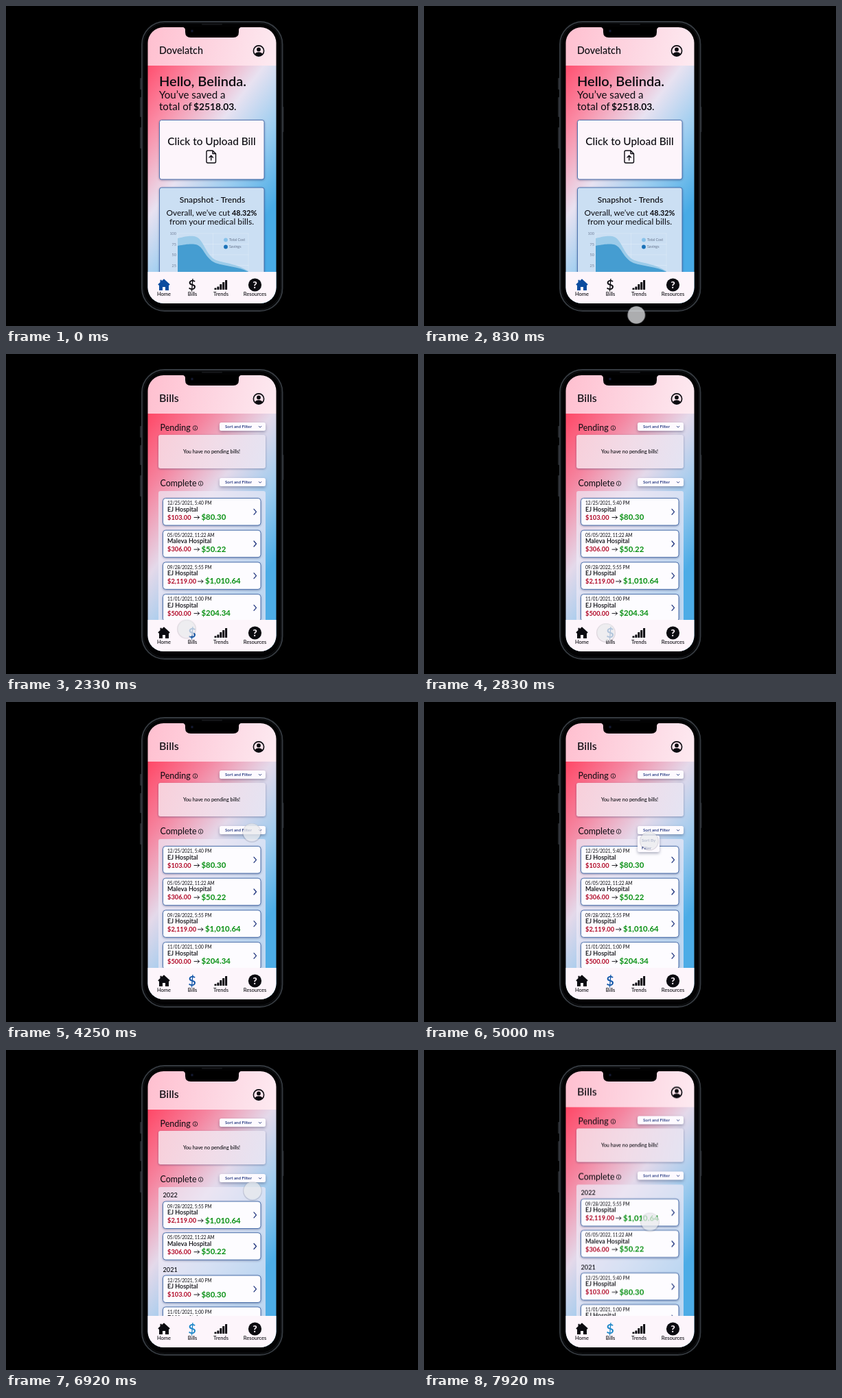
An HTML page for the animation above (8000 ms loop, 600 by 467 pixels).

```html
<!DOCTYPE html>
<html lang="en">
<head>
<meta charset="utf-8">
<title>Medical bill app</title>
<style>
  html, body { margin: 0; width: 100%; height: 100%; overflow: hidden; background: #000; }
  svg { display: block; width: 100vw; height: 100vh; }
  text { font-family: Lato, "Open Sans", sans-serif; white-space: pre; }
  .lift { filter: drop-shadow(0 1.5px 1.5px rgba(30, 40, 90, .4)); }
  .pop { filter: drop-shadow(0 2px 2px rgba(20, 30, 70, .35)); }
  .line { fill: none; stroke-linecap: round; stroke-linejoin: round; }
</style>
</head>
<body>
<svg id="stage" viewBox="0 0 600 467" xmlns="http://www.w3.org/2000/svg"></svg>
<script>
const LOOP = 8000;
const ENTER = 600, OPEN_BILLS = 2000, OPEN_MENU = 4500, OPEN_SORT = 5080, SORTED = 6500;
const INK = '#0b0b10', NAVY = '#1a2f7a', PAPER = '#fdf5fb', EDGE = '#4068a8';

const text = (x, y, size, str, { weight = 400, fill = INK, anchor = 'start' } = {}) =>
  `<text x="${x}" y="${y}" font-size="${size}" font-weight="${weight}" fill="${fill}" text-anchor="${anchor}">${str}</text>`;
const box = (x, y, w, h, r, fill, extra = '') =>
  `<rect x="${x}" y="${y}" width="${w}" height="${h}" rx="${r}" fill="${fill}" ${extra}/>`;
const line = (d, stroke, width) =>
  `<path class="line" d="${d}" stroke="${stroke}" stroke-width="${width}"/>`;
const dot = (x, y, r, fill, extra = '') =>
  `<circle cx="${x}" cy="${y}" r="${r}" fill="${fill}" ${extra}/>`;
const group = (id, body) => `<g id="${id}">${body}</g>`;
const edged = `stroke="${EDGE}" stroke-width=".9" class="lift"`;

function gradient(id, [x1, y1, x2, y2], stops) {
  const list = stops.map(([at, color]) => `<stop offset="${at}" stop-color="${color}"/>`).join('');
  return `<linearGradient id="${id}" gradientUnits="userSpaceOnUse" x1="${x1}" y1="${y1}" x2="${x2}" y2="${y2}">${list}</linearGradient>`;
}

const defs = `<defs>
  ${gradient('homeBg', [206, 87, 421, 251], [[0, '#ff4f6f'], [.22, '#fa8ba5'], [.5, '#e8e2f1'], [.74, '#9bcdf0'], [1, '#48abe6']])}
  ${gradient('billsBg', [206, 87, 427, 256], [[0, '#ff4766'], [.25, '#f5849f'], [.52, '#e4d9ea'], [.75, '#9fcbee'], [1, '#4cace6']])}
  ${gradient('headBg', [206, 45, 394, 80], [[0, '#ffc0d0'], [.6, '#fdd9e4'], [1, '#fdeaf1']])}
  ${gradient('pendingBg', [222, 118, 378, 167], [[0, '#f8cfda'], [.5, '#f1dce8'], [1, '#e4e4f3']])}
  <clipPath id="screen"><rect x="206.5" y="31" width="187" height="403" rx="23"/></clipPath>
</defs>`;

const phone =
  box(195, 105, 3, 17, 1, '#24272b') + box(195, 133, 3, 29, 1, '#24272b') +
  box(195, 177, 3, 31, 1, '#24272b') + box(402, 147, 2.5, 37, 1, '#24272b') +
  box(198, 23, 204.5, 422, 33, '#000', 'stroke="#353a40" stroke-width="1.9"') +
  box(200.3, 25.3, 200, 417.4, 31, '#020203', 'stroke="#15171a" stroke-width="1"');

const notch =
  '<path d="M256 30.5q5 .5 5 4.500v3q0 8 8 8h62q8 0 8-8v-3q0-4 5-4.500z" fill="#000"/>' +
  dot(271, 36.5, 2.2, '#0a0d18') + dot(271, 36.5, .9, '#1c2547') + box(285, 26, 30, 1.6, .8, '#17191c');

const header = (title, size) =>
  box(200, 20, 200, 67, 0, 'url(#headBg)') +
  text(223, 70.3, size, title, { weight: 500 }) +
  dot(368, 65.5, 7.6, 'none', `stroke="${INK}" stroke-width="1.6"`) +
  dot(368, 63.4, 2.9, INK) +
  `<path d="M362.300 70.300q1.700-3 5.700-3t5.700 3q-2.200 2.800-5.700 2.800t-5.700-2.800z" fill="${INK}"/>`;

function nav(homeColor, billsColor) {
  const label = (x, str) => text(x, 423, 7.5, str, { weight: 500, anchor: 'middle' });
  const bars = [2.5, 4.5, 8, 11, 14].map((h, i) => box(303.5 + i * 3.9, 414 - h, 3, h, .6, INK)).join('');
  return box(206, 388, 188, 47, 0, PAPER) +
    `<path d="M230 398.200l8.700 8-1 1.200h-.7v7.600h-5v-5h-4v5h-5v-7.600h-.7l-1-1.200 3.200-3v-3.400h2.200v1.400z" fill="${homeColor}"/>` +
    text(271, 414, 20, '$', { weight: 600, fill: billsColor, anchor: 'middle' }) + bars +
    dot(362.5, 407, 9.6, INK) +
    text(362.5, 412, 14, '?', { weight: 800, fill: PAPER, anchor: 'middle' }) +
    label(230, 'Home') + label(271.5, 'Bills') + label(313, 'Trends') + label(362.5, 'Resources');
}

function chart() {
  const levels = [[100, 332], [75, 347.5], [50, 363], [25, 378.5]];
  const grid = levels.map(([value, y]) =>
    text(248, y + 2, 5.5, value, { fill: '#75839c', anchor: 'end' }) +
    line(`M250 ${y}H353`, 'rgba(255,255,255,.4)', .5)).join('');
  const area = (d, fill) => `<path d="M250 ${d}V400H250z" fill="${fill}"/>`;
  const key = (y, color, str) => dot(320, y, 2.9, color) + text(325, y + 1.9, 5.3, str, { fill: '#66748c' });
  return grid + line('M250 332V390M301.500 332V390M353 332V390', 'rgba(255,255,255,.4)', .5) +
    area('339C262 336 267 335 274 336C288 338 290 364 306 371C322 376 338 377 353 387', '#9bcbe9') +
    area('350C262 348 267 347 276 348C288 350 289 368 305 375C320 380 338 380 353 388', '#459dd1') +
    key(341.3, '#88c2ea', 'Total Cost') + key(351.5, '#1b72b8', 'Savings');
}

const home =
  box(206, 31, 188, 404, 0, 'url(#homeBg)') + header('Dovelatch', 14.3) +
  text(223, 117, 20, 'Hello, Belinda.', { weight: 600 }) +
  text(223, 135, 15.1, 'You’ve saved a') +
  text(223, 151.5, 15.1, 'total of ') +
  text(273, 151.5, 13.8, '$2518.03', { weight: 700 }) + text(332, 151.5, 15, '.') +
  box(223.5, 166.5, 152.5, 86.5, 3, PAPER, edged) +
  text(299.5, 202.5, 15.4, 'Click to Upload Bill', { weight: 500, anchor: 'middle' }) +
  line('M301 211H294q-2 0-2 2V227q0 2 2 2H303.500q2 0 2-2V215.500zV215.500H305.500M298.700 225V218.500M296 221l2.700-2.700 2.700 2.700', INK, 1.4) +
  box(223.5, 265, 152.5, 150, 3, '#cbdff3', edged) +
  text(300.5, 286.5, 12.2, 'Snapshot - Trends', { weight: 500, anchor: 'middle' }) +
  text(233.5, 306, 11.9, 'Overall, we’ve cut ') +
  text(329, 306, 10.8, '48.32%', { weight: 700 }) +
  text(299.5, 319, 12.2, 'from your medical bills.', { anchor: 'middle' }) + chart();

const section = (y, title, infoX) =>
  text(224.5, y, 12.5, title) +
  dot(infoX, y - 4, 3.3, 'none', `stroke="${INK}" stroke-width=".8"`) +
  line(`M${infoX} ${y - 4}v1.500M${infoX} ${y - 5.7}v.1`, INK, .9) +
  box(311, y - 12, 67, 12, 2.5, '#fdfaff', 'class="pop"') +
  text(319, y - 3.8, 6.2, 'Sort and Filter', { weight: 600, fill: NAVY }) +
  line(`M368.300 ${y - 6.6}l1.800 1.800 1.800-1.800`, NAVY, .9);

const billsPage =
  box(206, 20, 188, 425, 0, 'url(#billsBg)') + header('Bills', 16) +
  section(112, 'Pending', 275.5) +
  box(222, 118, 156, 49, 3, 'url(#pendingBg)', 'class="lift"') +
  text(299.5, 145, 7.3, 'You have no pending bills!', { weight: 500, anchor: 'middle' }) +
  section(193, 'Complete', 283.5) +
  box(222, 200, 156, 240, 3, 'rgba(238,234,247,.7)');

const xmas = ['12/25/2021, 5:40 PM', 'EJ Hospital', '$103.00', '$80.30'];
const may = ['05/05/2022, 11:22 AM', 'Maleva Hospital', '$306.00', '$50.22'];
const autumn = ['09/28/2022, 5:55 PM', 'EJ Hospital', '$2,119.00', '$1,010.64'];
const november = ['11/01/2021, 1:00 PM', 'EJ Hospital', '$500.00', '$204.34'];

function bill(y, [date, place, before, after]) {
  const shift = before.length > 7 ? 5.5 : 0;
  return box(228.5, y, 142.5, 39.5, 4, '#fdfcff', edged) +
    text(235, y + 9.7, 6.6, date) +
    text(235, y + 19, 9, place, { weight: 600 }) +
    text(235, y + 31.2, 9.3, before, { weight: 700, fill: '#b00725' }) +
    line(`M${274 + shift} ${y + 28}h7.500m-2.500-2.300l2.500 2.300-2.500 2.300`, INK, .9) +
    text(284.5 + shift, y + 31.5, 11.4, after, { weight: 700, fill: '#079012' }) +
    line(`M361 ${y + 15.8}l3.500 4-3.500 4`, NAVY, 1.2);
}

const listed = [xmas, may, autumn, november].map((b, i) => bill(210.5 + i * 46.7, b)).join('');
const year = (y, str) => text(228.5, y, 9.2, str, { weight: 500 });
const sorted = year(215, '2022') + bill(221, autumn) + bill(266.7, may) +
  year(323.7, '2021') + bill(329, xmas) + bill(375, november);

const item = (x, y, str) => text(x, y, 6.2, str, { weight: 600, fill: NAVY });
const menu = box(311, 195, 32, 24, 2.5, '#fdfaff', 'class="pop"') +
  item(317, 203.5, 'Sort By') + item(317, 214.5, 'Filter');
const submenu = box(311, 196, 32, 11, 0, '#bfc0cb') + item(317, 203.5, 'Sort By') +
  box(338, 195, 49, 49.5, 3, '#fdfaff', 'class="pop"') +
  item(342, 204.3, 'Most Recent') + item(342, 215, 'Costs: Low to') + item(342, 221.7, 'High') +
  item(342, 232.3, 'Costs: High to') + item(342, 239, 'Low');

// The shadow is a ring so that it does not darken the translucent disc.
const pointer = dot(0, 1, 13.2, 'none', 'stroke="rgba(40,40,60,.14)" stroke-width="1.6"') +
  dot(0, 0, 12.8, 'rgba(232,233,236,.74)');

document.getElementById('stage').innerHTML = defs + box(0, 0, 600, 467, 0, '#000') + phone +
  `<g clip-path="url(#screen)">` +
  group('home', home) +
  group('bills', group('scroll', billsPage + group('listed', listed) + group('sorted', sorted) +
    group('menu', menu) + group('submenu', submenu))) +
  group('navHome', nav('#0b4c9f', INK)) +
  group('navBills', nav(INK, '#1156a8')) +
  group('navSorted', nav(INK, '#1b86c8')) +
  '</g>' + notch + group('pointerShow', group('pointer', pointer));

const play = (id, frames) =>
  document.getElementById(id).animate(frames, { duration: LOOP, iterations: Infinity });

function show(id, from, to) {
  const steps = [[0, from === 0 ? 1 : 0]];
  if (from > 0) steps.push([from, 1]);
  if (to < LOOP) steps.push([to, 0]);
  steps.push([LOOP, to < LOOP ? 0 : 1]);
  play(id, steps.map(([t, opacity]) => ({ offset: t / LOOP, opacity, easing: 'step-end' })));
}

function move(id, path) {
  play(id, path.map(([t, x, y, easing = 'ease-in-out']) =>
    ({ offset: t / LOOP, transform: `translate(${x}px, ${y}px)`, easing })));
}

show('home', 0, OPEN_BILLS);
show('navHome', 0, OPEN_BILLS);
show('bills', OPEN_BILLS, LOOP);
show('navBills', OPEN_BILLS, SORTED);
show('listed', OPEN_BILLS, SORTED);
show('menu', OPEN_MENU, SORTED);
show('submenu', OPEN_SORT, SORTED);
show('sorted', SORTED, LOOP);
show('navSorted', SORTED, LOOP);
show('pointerShow', ENTER, LOOP);

move('pointer', [
  [0, 545, 415], [ENTER, 545, 415, 'linear'], [830, 310, 451, 'ease-out'],
  [1080, 202, 437], [1500, 263, 400.5], [2300, 263, 400.5], [2600, 265, 406], [2950, 265, 406],
  [3650, 358, 190], [4600, 358, 190], [5000, 328, 202], [5600, 330, 202.5, 'ease-in'],
  [5750, 339, 203, 'ease-out'], [6000, 359, 205], [6950, 359, 205], [7450, 329, 254],
  [7750, 329, 254, 'linear'], [7920, 329, 250.5, 'linear'], [LOOP, 329, 249]
]);
move('scroll', [
  [0, 0, 0], [7750, 0, 0, 'linear'], [7920, 0, -3.6, 'linear'], [LOOP, 0, -5]
]);
</script>
</body>
</html>
```
